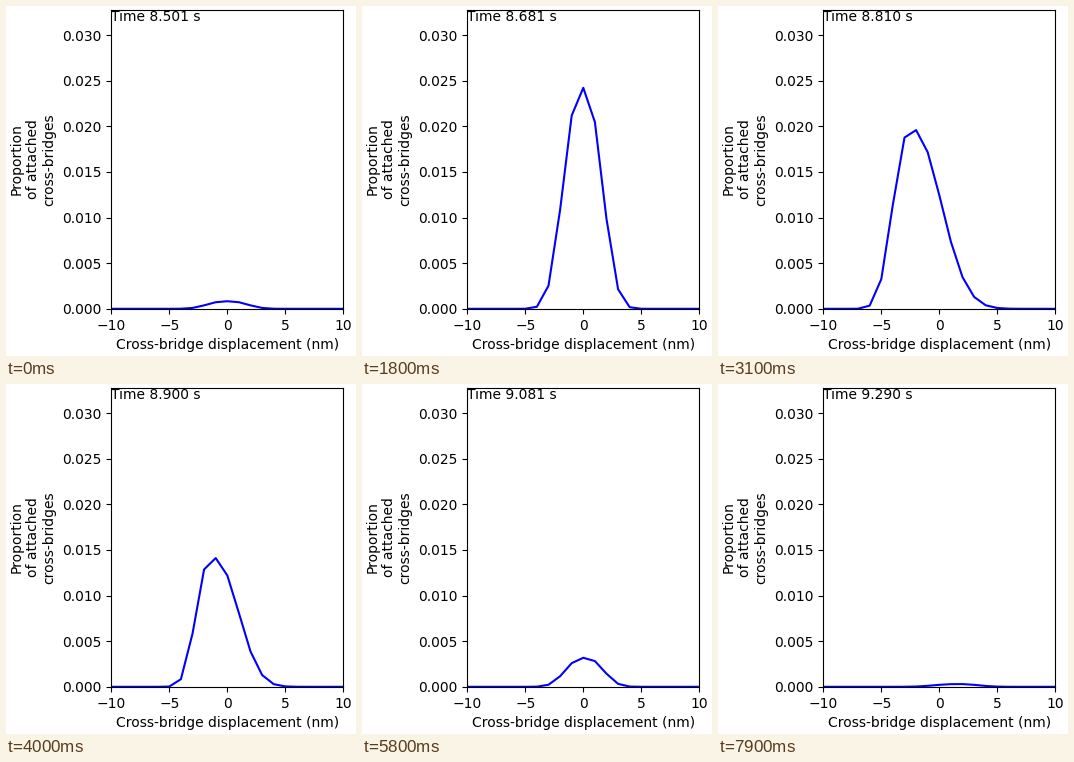
Recreate the animation shown at these times as a matplotlib script. Size 350x350 px, loop 8 s.

```python
import matplotlib.pyplot as plt
import numpy as np
from matplotlib.animation import FuncAnimation

SIZE, DPI = 350, 100
FRAMES, INTERVAL = 80, 100
x = np.arange(-10, 11)

# Phases of the beat: frame, peak (1/1000), centre, left width, right width
PHASES = np.array([
    (0, .83, 0, 2.2, 2.2),           # rest
    (9, .93, 0, 2.2, 2.2),
    (14, 7, 0, 2.12, 2.12),          # activation
    (20, 31.1, -.1, 2.15, 2.15),
    (22, 26.8, -2.4, 3.1, 3.3),      # shortening drags bridges left
    (24, 24.9, -2.8, 2.6, 3.54),
    (40, 14.18, -1.3, 1.78, 2.95),
    (51, 7.25, -.02, 2.11, 2.11),    # relaxation
    (67, .81, .3, 2.11, 2.04),
    (70, .5, 2.2, 3, 2.7),           # filling pulls bridges right
    (79, .3, 1.7, 2.66, 2.14),
])
times = PHASES[:, 0]
params = PHASES[:, 1:].copy()
params[:, 0] = np.log(params[:, 0] / 1000)


def tangents(t, v):
    """Monotone slopes: harmonic mean, zero at turning points."""
    d = np.diff(v, axis=0) / np.diff(t)[:, None]
    a, b = d[:-1], d[1:]
    same = a * b > 0
    inner = np.where(same, 2 * a * b / np.where(same, a + b, 1), 0)
    return np.vstack([d[:1], inner, d[-1:]])


slopes = tangents(times, params)


def ease(k):
    """Cubic Hermite interpolation of the phase parameters."""
    i = min(np.searchsorted(times, k, side="right") - 1, len(times) - 2)
    h = times[i + 1] - times[i]
    s = (k - times[i]) / h
    e = s * s * (3 - 2 * s)
    return (params[i] * (1 - e) + params[i + 1] * e
            + h * slopes[i] * s * (1 - s) ** 2
            - h * slopes[i + 1] * s * s * (1 - s))


def profile(k):
    """Skewed bell whose right tail softens as it moves off centre."""
    log_peak, centre, left, right = ease(k)
    d = x - centre
    width = np.where(d < 0, left, right)
    power = np.where(d < 0, 2.5, 2.5 - .14 * abs(centre))
    return np.exp(log_peak - (np.abs(d) / width) ** power)


fig = plt.figure(figsize=(SIZE / DPI, SIZE / DPI), dpi=DPI)
ax = fig.add_axes([105.3 / SIZE, 47.2 / SIZE, 232 / SIZE, 298.8 / SIZE])
ax.set_xlim(-10, 10)
ax.set_ylim(0, .03275)
ax.set_xticks(range(-10, 11, 5))
ax.set_yticks(np.arange(0, .031, .005))
ax.set_xlabel("Cross-bridge displacement (nm)")
ax.set_ylabel("Proportion\nof attached\ncross-bridges")

line, = ax.plot(x, profile(0), color="blue", lw=1.5)
clock = fig.text(105 / SIZE, 335 / SIZE, "", fontsize=10)


def update(k):
    line.set_ydata(profile(k))
    clock.set_text(f"Time {(17001 + 20 * k) / 2000:.3f} s")
    return line, clock


anim = FuncAnimation(fig, update, frames=FRAMES, interval=INTERVAL,
                     repeat=True, repeat_delay=0)
plt.show()
```
